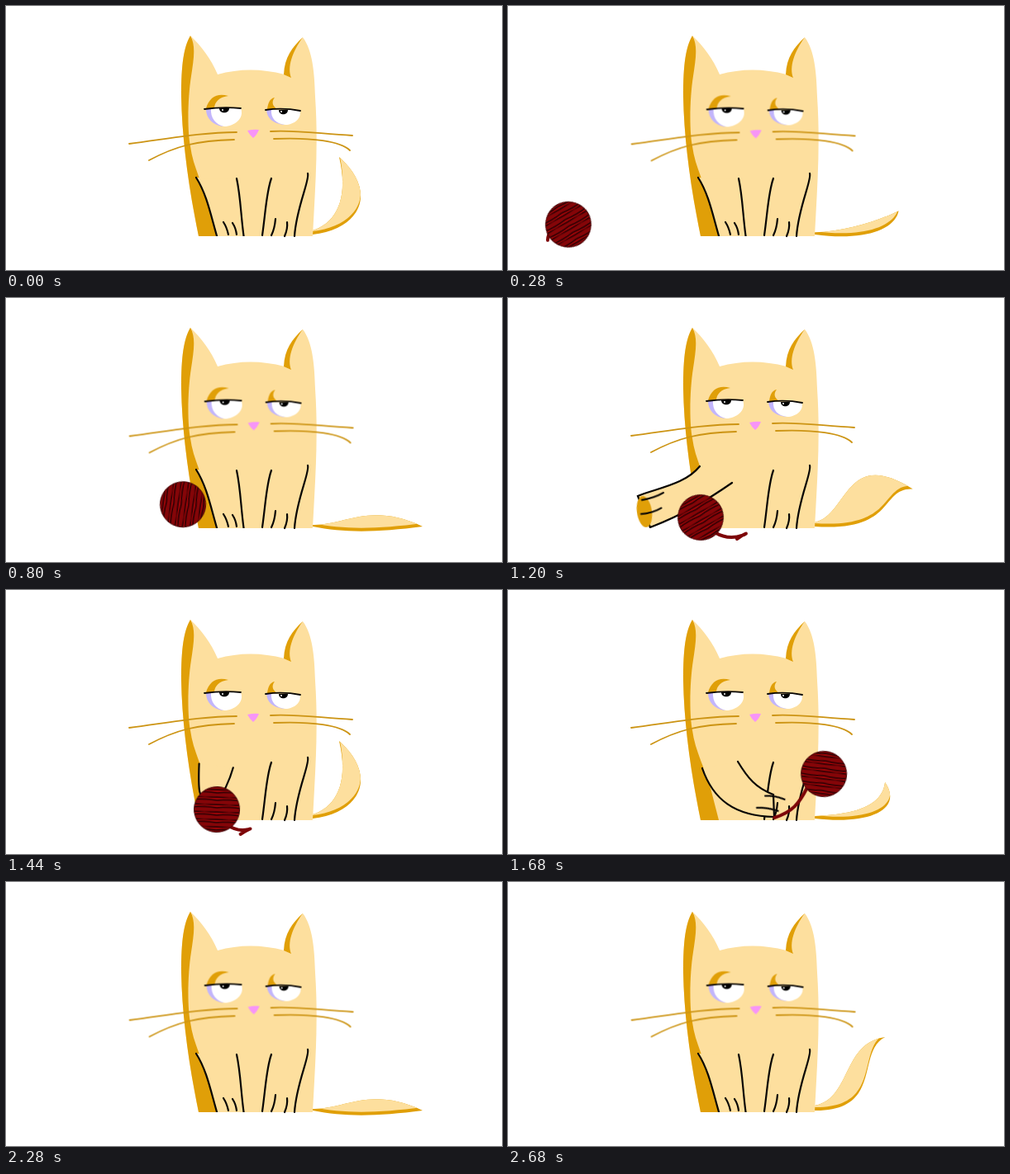
Write an HTML page without scripts that moves like this. It is 600 by 320 pixels and loops after 2760 ms.

```html
<!DOCTYPE html>
<html lang="en">
<head>
<meta charset="utf-8">
<title>Cat and yarn</title>
<style>
html, body { margin: 0; width: 100%; height: 100%; overflow: hidden; background: #fff; }
svg { display: block; width: 600px; height: 320px; }
.fur { fill: #fddf9e; }
.shade { fill: #e09f08; }
.ink { stroke: #080604; stroke-width: 2.2; stroke-linecap: round; vector-effect: non-scaling-stroke; }
.line { fill: none; }
.whiskers { fill: none; stroke: #cc9414; stroke-width: 1.8; stroke-linecap: round; }
.yarn { fill: none; stroke: #7d0508; stroke-width: 4; stroke-linecap: round; }
.move { animation: 2760ms linear infinite; }

/* hand-drawn line jitter */
.face { animation: jitter 240ms step-end infinite; }
@keyframes jitter {
  0%, 83.33% { transform: none; }
  16.66% { transform: translate(.6px, .4px); }
}

.tail { animation-name: tail; }
@keyframes tail {
  0%, 2.9%, 47.8%, 55.1%, 100% { d: path("M371 272C396 264 416 238 403 183C450 225 430 270 371 277"); }
  8.7%, 60.9% { d: path("M371 274C405 272 452 268 456 233C478 265 440 285 371 277"); }
  13%, 37.7%, 65.2%, 89.9% { d: path("M371 275C410 276 440 247 504 277C450 284 410 285 371 277"); }
  43.5%, 95.7% { d: path("M371 272C412 262 408 180 490 232C450 230 470 284 371 277"); }
  44.9%, 97.1% { d: path("M371 271C416 262 404 194 457 188C420 205 455 278 371 277"); }
}

/* front leg: rest, reach out, swipe across */
.leg { animation-name: leg; }
@keyframes leg {
  0%, 30.4%, 69.6%, 100% { d: path("M230 208C243 228 248 255 256 282L288 282C284 255 284 232 279 209"); }
  39.1%, 47.1% { d: path("M232 204C214 226 182 230 157 240L172 278C214 262 245 242 271 224"); }
  56.5%, 62.3% { d: path("M235 216C248 254 274 274 322 275L321 248C300 240 290 228 278 208"); }
}
.toes { animation-name: toes; }
@keyframes toes {
  0%, 30.4%, 69.6%, 100% { transform: translate(263px, 262px); }
  39.1%, 47.1% { transform: translate(188px, 236px) rotate(93deg) scale(1.7); }
  56.5%, 62.3% { transform: translate(301px, 264px) rotate(-60deg) scale(1.6); }
}
.sole { animation-name: sole; }
@keyframes sole {
  0%, 30.4%, 56.5%, 100% { transform: translate(272px, 278px) scale(0); }
  39.1%, 47.1% { transform: translate(165px, 259px) rotate(-8deg); }
}

.ball-x { animation-name: ball-x; }
@keyframes ball-x {
  0%, 1.4% { transform: translateX(-32px); }
  18.8% { transform: translateX(176px); }
  29% { transform: translateX(214px); }
  43.5%, 50.7% { transform: translateX(233px); }
  60.9% { transform: translateX(382px); }
  79%, 100% { transform: translateX(670px); }
}
/* each bounce falls with ease-in and rises with ease-out */
.ball-y { animation-name: ball-y; animation-timing-function: cubic-bezier(.33, 0, .67, .33); }
@keyframes ball-y {
  0%, 1.4% { transform: translateY(200px); }
  15.9% { transform: translateY(224px); }
  27.5% { transform: translateY(247px); }
  60.9% { transform: translateY(223px); }
  73.2% { transform: translateY(240px); }
  10.1%, 23.2%, 31.2%, 54.3%, 67.4%, 79%, 100% {
    transform: translateY(266px);
    animation-timing-function: cubic-bezier(.33, .67, .67, 1);
  }
}
.spin { animation-name: spin; }
@keyframes spin {
  0%, 1.4% { transform: rotate(-100deg); }
  18.8% { transform: rotate(38deg); }
  29% { transform: rotate(98deg); }
  43.5%, 50.7% { transform: rotate(150deg); }
  60.9% { transform: rotate(367deg); }
  79%, 100% { transform: rotate(720deg); }
}
.strand { animation-name: strand; }
@keyframes strand {
  0%, 18.8%, 79%, 100% { d: path("M-20 8C-24 11 -25 14 -25 19"); }
  24%, 33% { d: path("M0 8C2 10 6 12 10 14"); }
  43.5%, 50.7% { d: path("M17 18C45 35 70 8 44 26"); }
  60.9% { d: path("M-20 16C-30 36 -38 46 -60 53"); }
}
</style>
</head>
<body>
<svg viewBox="0 0 600 320">
  <defs>
    <pattern id="wool" width="30" height="9" patternUnits="userSpaceOnUse">
      <path d="M0 2Q15 4 30 2M0 6Q15 5 30 6" fill="none" stroke="#2a0002" stroke-width="1.6"/>
      <path d="M0 4Q15 6 30 4" fill="none" stroke="#a80306"/>
    </pattern>
    <clipPath id="tail-shape"><path class="move tail"/></clipPath>
    <clipPath id="above-floor"><rect width="600" height="279"/></clipPath>
  </defs>

  <g clip-path="url(#tail-shape)">
    <rect class="shade" x="360" y="170" width="150" height="120"/>
    <g transform="translate(0 -4)"><path class="fur move tail"/></g>
  </g>

  <path class="fur" d="M223 36C236 48 248 64 256 83Q295 72 337 83C338 64 348 48 359 38C371 54 373 80 374 110C378 170 374 220 371 279H233C220 215 213 160 212 110C212 70 215 50 223 36Z"/>
  <path class="shade" d="M223 36C230 48 227 65 224 85C220 110 219 150 223 170C226 195 240 220 245 240L255 279H233C220 215 213 160 212 110C212 70 215 50 223 36Z"/>
  <path class="shade" d="M359 38C346 50 337 62 336 83L345 87C340 74 346 56 359 38Z"/>

  <g class="face">
    <path class="shade" d="M242 124C246 110 256 105 269 109C258 110 252 117 252 124Z"/>
    <path class="shade" d="M316 125C317 118 319 112 325 111C321 116 322 121 328 125Z"/>
    <path fill="#c2b5fb" d="M242 125H262V146C250 144 242 136 242 125ZM315 126H336V144C322 142 316 136 315 126Z"/>
    <path fill="#fff" d="M248 124H284C289 136 276 146 264 146C254 144 247 136 248 124ZM321 126H355C359 136 348 144 338 144C327 143 320 136 321 126Z"/>
    <path d="M258 124H270C270 131 258 131 258 124ZM330 126H341C341 133 330 133 330 126Z"/>
    <path class="ink line" style="stroke-width:1.8" d="M240 125Q262 122 284 124M314 126Q335 123 356 127"/>
    <g fill="#fff"><circle cx="262" cy="126" r="1"/><circle cx="333" cy="128" r="1"/></g>
    <path fill="#f795f7" d="M292 151Q300 149 306 150Q303 157 299 160Q295 157 292 151Z"/>
    <path class="whiskers" d="M149 167C190 162 235 153 279 153M173 187C205 170 230 163 276 162M320 152C350 150 380 155 419 157M324 161C370 159 405 164 416 175"/>
  </g>

  <path class="ink line" d="M321 209C315 225 314 250 310 278M365 203C368 210 351 245 349 279M326 258Q325 270 321 278M340 262Q341 270 337 279"/>
  <g clip-path="url(#above-floor)">
    <path class="fur ink move leg"/>
    <ellipse class="shade move sole" rx="9" ry="19"/>
    <path class="ink line move toes" d="M0 0Q4 6 6 15M11 1Q15 7 16 15"/>
  </g>

  <g class="move ball-x">
    <g class="move ball-y">
      <path class="yarn move strand"/>
      <g class="move spin">
        <circle r="27.5" fill="#850508"/>
        <circle r="27.5" fill="url(#wool)" stroke="#420204"/>
      </g>
    </g>
  </g>
</svg>
</body>
</html>
```
